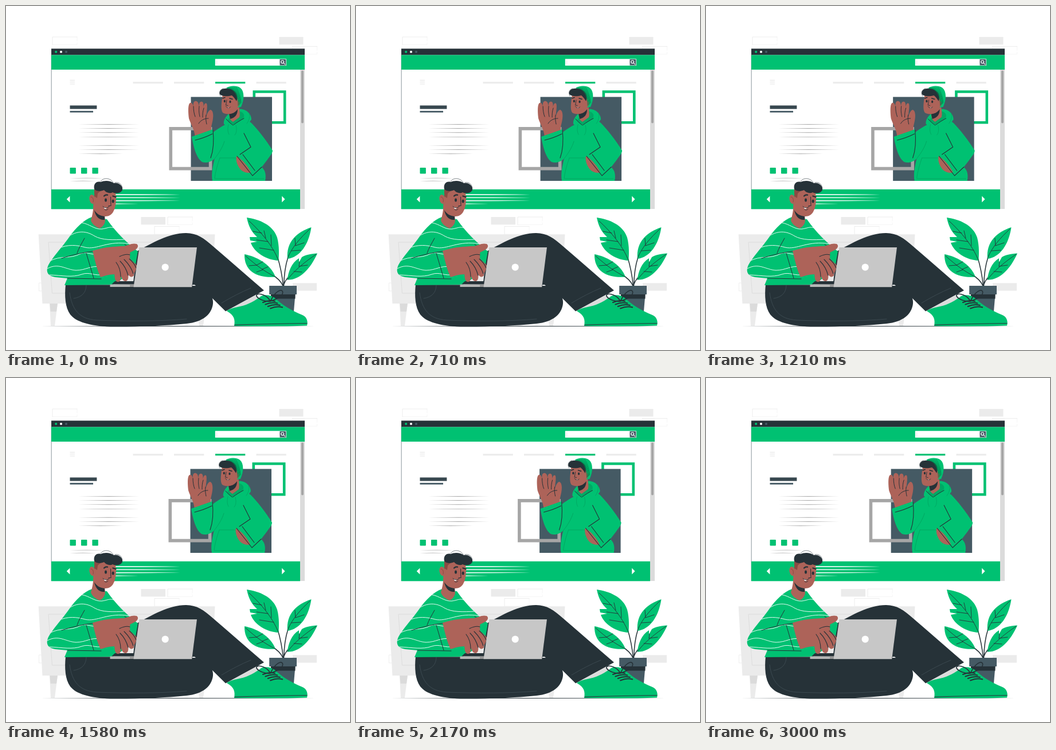
Write an HTML page with a canvas that moves like this. It is 600 by 600 pixels and loops after 3.04 s.

```html
<!DOCTYPE html>
<html lang="en">
<head>
<meta charset="utf-8">
<title>Web page illustration</title>
<style>
html, body { margin: 0; width: 100%; height: 100%; overflow: hidden; background: #fff; }
canvas { display: block; width: 600px; height: 600px; }
</style>
</head>
<body>
<canvas id="stage" width="600" height="600"></canvas>
<script>
const ctx = document.getElementById('stage').getContext('2d');
const GREEN = '#00c172', LEAF = '#00a862', DARK = '#263238', SLATE = '#455a64';
const SKIN = '#ad6359', SHADE = '#8a4b43';
const PALE = '#ebebeb', LIGHT = '#dbdbdb', GREY = '#a6a6a6', WHITE = '#fff';
const LOOP = 3040, FRAMES = 73;

function fill(color, d) {
  ctx.fillStyle = color;
  ctx.fill(new Path2D(d));
}
function line(color, width, d) {
  ctx.strokeStyle = color;
  ctx.lineWidth = width;
  ctx.stroke(new Path2D(d));
}
function box(color, x1, y1, x2, y2) {
  ctx.fillStyle = color;
  ctx.fillRect(x1, y1, x2 - x1, y2 - y1);
}
function round(color, x, y, w, h, r) {
  ctx.fillStyle = color;
  ctx.beginPath();
  ctx.roundRect(x, y, w, h, r);
  ctx.fill();
}
function oval(color, x, y, rx, ry = rx, a = 0) {
  ctx.fillStyle = color;
  ctx.beginPath();
  ctx.ellipse(x, y, rx, ry, a, 0, 7);
  ctx.fill();
}
// Thin stroke that swells in the middle and fades at both ends.
function taper(color, x1, x2, y, h) {
  const m = (x1 + x2) / 2;
  fill(color, `M${x1} ${y}Q${m} ${y - h} ${x2} ${y}Q${m} ${y + h} ${x1} ${y}Z`);
}
function ghost(x, y) {
  line(LIGHT, 0.5, `M${x + 43} ${y}H${x}V${y + 13.5}`);
  line(PALE, 0.5, `M${x + 43} ${y}V${y + 7}M${x} ${y + 13.5}H${x + 43}V${y + 10}`);
}

function room() {
  ghost(81, 54);
  ghost(499.5, 70.5);
  ghost(282, 368);
  ghost(259, 384.5);
  line(PALE, 0.8, 'M62 483H57.5V497H62');
  box(PALE, 476.5, 54, 518.5, 67.3);
  box(PALE, 235.5, 368, 278, 381.3);
  box(PALE, 500, 483.3, 542, 496.6);
  fill(PALE, 'M76 519H90L85 558H78ZM330 519H349L344 558H337Z');
  fill(LIGHT, 'M76.5 519H90L88 533H77.5Z');
  fill(PALE, 'M56.7 398.3H364.5L358 519H63.5Z');
  line(LIGHT, 0.9, 'M345 412H74L80.5 501H340');
}

function browser() {
  box(WHITE, 79, 74, 521, 354);
  box('#7d8a90', 78.7, 85, 79.6, 354);
  box(DARK, 79, 74.4, 521, 85.5);
  oval(GREEN, 87.2, 80, 2.1);
  oval(WHITE, 96, 80, 2.1);
  oval(SLATE, 105, 80, 2.1);
  box(GREEN, 79, 85.5, 521, 111);
  box(WHITE, 364.8, 92.3, 489, 104);
  box(LIGHT, 367.2, 95, 367.9, 101.5);
  box(SLATE, 477.5, 93, 488.2, 103.4);
  line(WHITE, 1.2, 'M484.6 97.4A2.4 2.4 0 1 0 479.8 97.4A2.4 2.4 0 1 0 484.6 97.4M484 99.2L486.5 101.7');

  box(LIGHT, 513, 111, 521, 354);
  round(GREY, 515, 112.5, 4, 92, 2);
  for (const y of [129.5, 132.7, 136]) box(LIGHT, 111.5, y - 0.4, 120, y + 0.4);
  [221.5, 293, 365, 436.5].forEach((x, i) => box(i === 2 ? GREEN : PALE, x, 132.2, x + 52.3, 135.3));
  box('#37474f', 111.5, 173.5, 158.4, 179.6);
  box(SLATE, 111.5, 182.9, 152, 185.7);
  for (const y of [206.5, 213.5, 220.7, 228.4, 243.2, 250.5]) taper(GREY, 126, 232, y, 0.9);
  taper(GREY, 126, 204, 257.8, 0.9);
  for (const x of [111.5, 131, 150.4]) round(GREEN, x, 282, 10.4, 10.5, 1);
  taper(GREY, 111, 171, 300.2, 0.8);
  taper(GREY, 111, 157, 305.2, 0.8);

  box(GREEN, 79, 319.8, 513, 354.3);
  fill(WHITE, 'M105.8 337L111.4 331.5V342.5ZM486.6 337L481.2 331.5V342.5Z');
  for (const [y, x] of [[328.9, 304], [334.3, 304], [339.6, 304], [345, 231]])
    fill(WHITE, `M185 ${y - 0.8}Q${x - 45} ${y - 0.8} ${x} ${y}Q${x - 45} ${y + 0.8} 185 ${y + 0.8}Z`);
}

function greeter() {
  line(GREEN, 4.6, 'M432.8 149.5H486.2V203.2H432.8Z');
  box(SLATE, 322.5, 158.6, 464, 305);
  line(GREY, 5.6, 'M287.3 213.9H356.6V283.6H287.3Z');

  // raised hand
  fill(SKIN, 'M330 230C329 215 322 206 319 196C318 188 317 174 320 170C323 167 326 170 327 176C326 169 328 165 332 166C336 167 336 172 337 177C336 170 338 166 342 167C345 168 345 174 344 179C345 172 347 168 350 170C352 174 350 184 349 193C351 188 353 182 357 181C361 182 362 190 361 196C360 206 356 212 359 220L332 232Z');
  line(DARK, 1, 'M327 175C327 182 328 188 330 193M337 175C336 183 337 188 338 193M345 178C343 184 343 189 343 194M349 190C348 197 349 201 350 206M353 196C345 196 339 200 336 205');

  // torso and arms
  fill(GREEN, 'M324 228L361 215L362 220C370 213 378 210 388 203C397 197 418 196 428 204C438 214 454 234 465 252C465 257 460 262 456 268L446 281C453 287 454 296 452 305H360C358 294 360 281 364 266C359 271 350 275 342 272C332 265 327 246 324 228Z');
  line(DARK, 1.1, 'M330 234C342 231 352 227 360 223M361 216C363 236 361 254 357 265M415 222L427 246L408 259');
  line(LEAF, 1, 'M364 266C372 256 378 246 381 236M373 265C369 276 365 290 364 301H450M373 265H401');
  fill(SKIN, 'M402 262C400 269 404 281 411 287C417 291 423 292 427 290C423 281 413 268 402 262Z');
  line(DARK, 1.1, 'M403 262L430 296L446 281M413 259L434 287');

  // hood and neck
  fill(GREEN, 'M380 206C378 196 390 183 405 180C418 178 428 188 428 198L422 206L398 216Z');
  fill('#00a965', 'M386 200C391 190 402 183 409 184C417 187 417 194 411 199L396 207Z');
  fill(SKIN, 'M389 185L406 172C407 181 409 189 407 194L396 202C390 199 389 193 389 185Z');
  fill(DARK, 'M389 188C396 188 401 184 404 180C404 189 400 195 391 197Z');
  line(DARK, 1, 'M384 197C388 202 392 205 396 208C403 203 409 199 415 196');
  line(LEAF, 0.9, 'M396 208C397 203 402 198 407 196M388 207C386 215 387 220 389 224M401 208C403 216 402 222 399 225M424 187C426 193 424 200 420 205');

  // head
  fill(SKIN, 'M378 154L405 156C407 168 405 178 400 184C395 189 383 190 378 186C374 180 376 168 378 154Z');
  fill(GREEN, 'M384 143C390 139 402 138 409 143C416 149 416 163 410 176L404 177C406 167 405 158 398 151Z');
  fill(DARK, 'M373 154C371 147 378 143 386 144C394 144 402 149 403 156C404 160 403 163 402 166C400 163 398 159 394 156C386 158 377 158 373 154Z');
  oval(SKIN, 404, 171, 3.2, 5, 0.2);
  for (let i = 0; i < 6; i++)
    line('#00804b', 0.7, `M${386 + i * 3} ${143 - i * 0.25}C${397 + i * 2} ${144 + i} ${405 + i * 1.1} ${155 + i * 2} ${405 + i} ${174 - i}`);
  line(DARK, 0.6, 'M374 157C370 150 374 145 379 144');
  oval(DARK, 381.3, 166, 1.6, 2.3);
  oval(DARK, 391, 167, 1.6, 2.3);
  line(DARK, 1.6, 'M378 161L382 159.6M390 161L395 162.5');
  line(DARK, 0.9, 'M385 164L383.5 173L387 173.5');
  fill(WHITE, 'M384.5 175.5C386 177.5 389 177.5 390 176L388 178.5Z');
  line(DARK, 0.8, 'M383.5 175C386 178.5 389 179 391.5 176');
}

function plant() {
  line(DARK, 1.5, 'M483.5 489C482 472 479 455 473 436M484.5 489C485 468 487 453 492 438M484 489C485 482 489 476 495 470M483 488C479 479 470 472 463 468');
  fill(GREEN, 'M420 369C442 372 466 382 473 404C477 419 476 434 475.5 444C454 443 433 430 427 413L438 411L426 409L425 403L438 403C428 394 423 384 420 369Z');
  fill(GREEN, 'M532.5 386C508 394 488 411 491 441C513 438 528 416 532.5 386Z');
  fill(GREEN, 'M543 431.5C532 432 523 434 516 438L511 447L511 440C497 449 493 463 490.5 477.5C511 479 531 459 543 431.5Z');
  fill(GREEN, 'M416 433C436 437 461 449 470 472.5C440 475 415 464 416 433Z');
  line(DARK, 0.9, 'M424 375C445 394 465 418 475 443M453 405L450 392M463 418L462 399M446 396L431 393M457 411L437 408M467 426L442 422M530 389C514 404 499 420 491 440M505 418L504 405M505 418L520 413M498 427L514 426M541 433C522 446 504 460 491 477M511 454L512 446M511 454L526 452M502 463L516 464M418 436C437 453 451 463 469 472M437 452L448 446M447 459L457 455M437 452L424 453M448 460L437 464');

  box(SLATE, 459.2, 488, 507, 503);
  fill(SLATE, 'M462 503H504.5L502 532H465Z');
  box(DARK, 462, 503, 504.5, 510.5);
}

function legs() {
  fill(DARK, 'M228 428C256 413 284 396 314 396C333 396 345 405 361 419C390 444 421 471 450 496L383 532.5L350 500L220 500Z');
  fill(DARK, 'M104 486L335 487C352 493 362 506 361 519C359 538 343 551 315 554C275 558 225 560 182 559.5C146 558 122 551 112 538C103 526 102 505 104 486Z');
  line('#46545b', 0.7, 'M111 500C115 530 128 546 158 548C210 550 270 550 315 546M140 487C140 500 132 508 118 510M376 518C393 508 410 499 427 492');

  // shoe
  fill(LIGHT, 'M388 530L436 504L444 512L400 533Z');
  fill(GREEN, 'M385 532C391 527 400 526 408 524C423 521 436 513 445 506C452 503 463 504 470 510C481 521 498 531 517 539C525 542 527 551 525 557.5C484 559 440 559 398 558C400 547 398 539 385 532Z');
  line(DARK, 1, 'M399 556C442 555 485 554 525 553.5');
  line(DARK, 1.7, 'M461 515C451 516 440 511 437 506C436 502 442 501 449 504C454 506 459 511 461 515C465 507 470 498 478 496C484 495 484 502 479 506C474 510 467 513 461 515');
  for (let i = 0; i < 4; i++) {
    const x = 448 + i * 4.4, y = 517 + i * 3.5;
    line(DARK, 2, `M${x} ${y}C${x + 7} ${y - 3} ${x + 14} ${y - 4} ${x + 21} ${y - 2}`);
  }
}

function sitter() {
  // shirt
  const shirt = 'M150 368C135 373 121 388 111 402C97 422 78 442 73 454C69 465 74 471 86 473L107 475L102 487L187 486L224 462L230 428C212 414 192 395 176 372Z';
  fill(GREEN, shirt);
  ctx.save();
  ctx.clip(new Path2D(shirt));
  line(WHITE, 0.9, 'M132 378C146 380 154 390 167 389C176 388 181 384 188 387M112 400C126 392 140 392 154 401C168 409 186 408 208 407M91 423C108 415 124 417 138 421C158 426 178 408 216 415M76 445C96 434 112 442 130 432C142 427 150 437 170 432M72 458C92 447 104 460 122 461C140 461 147 452 165 455M76 469C98 470 116 474 132 468C146 463 156 472 170 468');
  ctx.restore();
  line(DARK, 1, 'M137 405C132 414 127 422 124 431M97 440C113 435 132 430 151 428M140 431L153 475M107 475L166 476M207 416L222 426');

  // neck and head
  fill(SKIN, 'M152 343L172 363L173 375C172 381 168 386 163 388C156 385 150 380 148 374C151 364 153 354 152 343Z');
  fill(DARK, 'M154 356C159 364 166 367 172 366L172 373C163 374 156 367 154 356Z');
  fill(SKIN, 'M156 319L190 322C193 334 193 348 187 359C182 368 171 369 164 364C158 359 155 353 153 345Z');
  oval(SKIN, 150.5, 337, 5, 8.2, -0.2);
  fill(SHADE, 'M154 319L169 319L160 327L159 335L154 332Z');
  line(SHADE, 1, 'M148 333C152 333 153 338 152 342');
  fill(DARK, 'M154 319C152 310 158 305 165 307C171 304 182 304 188 309C197 307 204 314 203 320C201 327 192 328 186 325C181 328 174 325 171 321C165 324 156 323 154 319Z');
  line(DARK, 0.6, 'M165 306C169 299 182 299 187 308M190 308C199 306 205 314 202 322');
  oval(DARK, 174, 338.6, 2, 3);
  oval(DARK, 186.7, 340.5, 2, 3);
  line(DARK, 2.3, 'M171 331.5C173 329.5 175 329 177 329.6M186.5 331.5L191.5 333.2');
  line(DARK, 1.1, 'M182.5 333L183 348.5L179 348.5');
  fill(WHITE, 'M170.5 350C172 351.5 174 352 176 351.5C175 354.5 173 354.5 171.5 353Z');
  line(DARK, 1, 'M169 349.5C173 353 177 353 180.5 349M172 355C174 356.5 176 356 178 354');

  // laptop base
  fill(DARK, 'M184 485.5L190 480H226V486Z');
  box('#b5b5b5', 181.5, 485.5, 224, 490);
  box('#969696', 216, 485.5, 224, 490);

  // hands
  fill(SKIN, 'M206 419C213 417 220 413 228 415C232 418 230 423 224 426L214 431L204 436ZM212 438C219 443 225 448 229 454L224 466C216 459 211 450 212 438Z');
  fill(SKIN, 'M151 427C168 421 189 419 206 419C214 422 218 429 216 436C216 447 225 459 223 470C220 474 216 473 213 468C214 474 213 479 209 480C204 480 202 475 200 470C201 477 199 482 194 481C189 479 190 473 189 468C180 468 171 471 165 473C159 461 155 444 151 427Z');
  line(DARK, 1.1, 'M192 447C198 455 200 463 200 472M199 445C207 453 211 462 213 470M206 442C213 449 219 457 222 467M216 434C210 432 204 434 198 437M215 441C221 446 225 451 227 457');

  // laptop screen
  fill('#c7c7c7', 'M232.5 421H333L324.2 490.2H222.5Z');
  fill(WHITE, 'M325.5 486.2H329L331 488H325Z');
  oval(WHITE, 277.7, 455.6, 6.1);
}

// Shake path: displacement at every tenth of the run.
const STOPS = [0, -1, 2, -4, 4, -4, 4, -4, 2, -1, 0, 0];
function shake(t) {
  const k = Math.floor(t * FRAMES / LOOP + 0.05);
  const u = Math.min(10, (k + 1) / 7.25);
  const i = Math.floor(u);
  return 1.2 * (STOPS[i] + (STOPS[i + 1] - STOPS[i]) * (u - i)) + 0.16;
}

function draw(t) {
  ctx.fillStyle = WHITE;
  ctx.fillRect(0, 0, 600, 600);
  ctx.lineCap = ctx.lineJoin = 'round';
  room();
  ctx.lineJoin = 'miter';
  browser();
  ctx.save();
  ctx.translate(shake(t), 0);
  greeter();
  ctx.restore();
  ctx.lineJoin = 'round';
  taper(DARK, 60, 540, 558.5, 1.2);
  plant();
  legs();
  sitter();
}

const start = performance.now();
function tick() {
  draw((performance.now() - start) % LOOP);
  requestAnimationFrame(tick);
}
tick();
</script>
</body>
</html>
```
